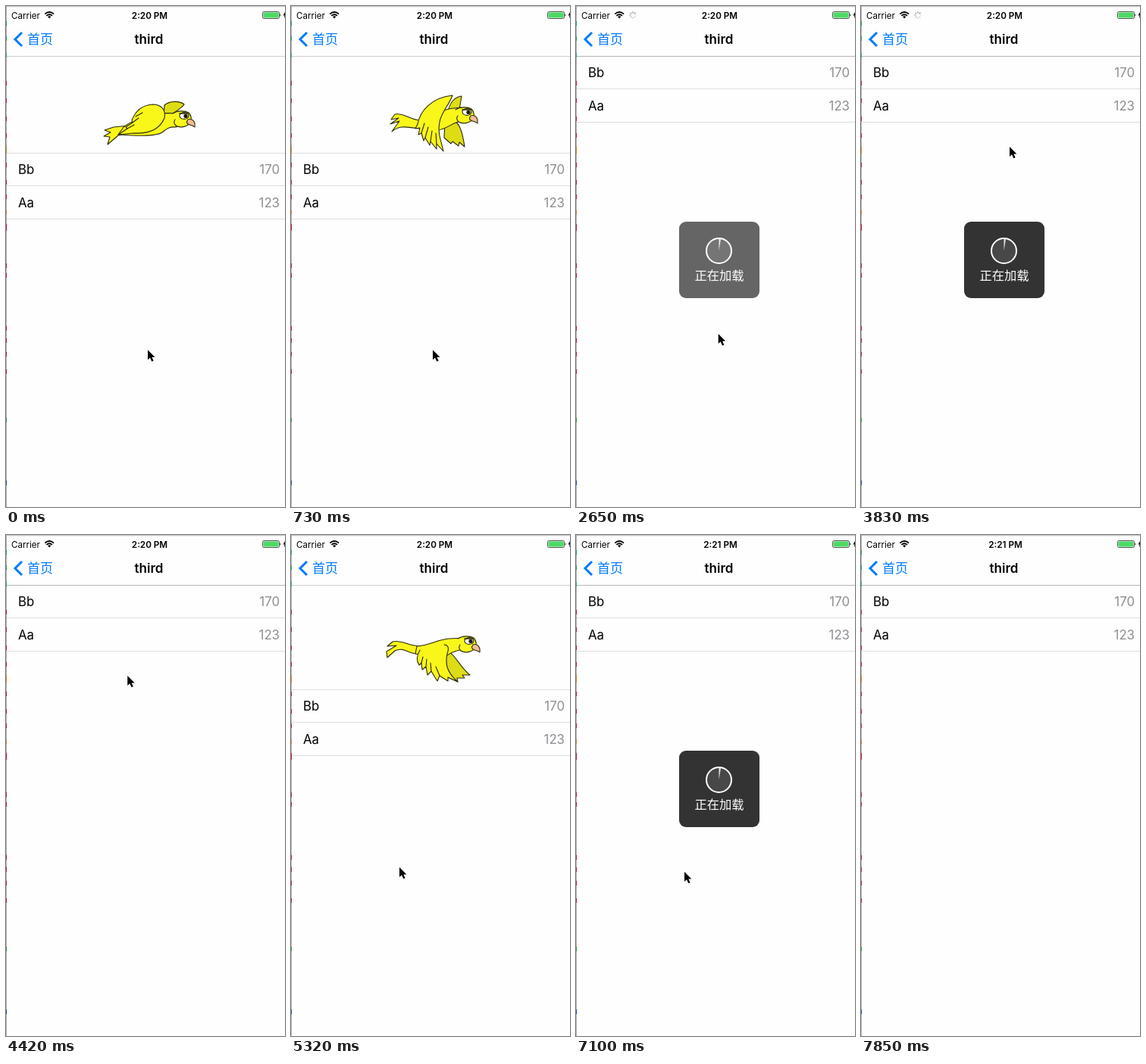
These frames come from a looping animation (368 px wide and 662 px high, 9.35 s). An HTML page:

```html
<!DOCTYPE html>
<html lang="zh">
<head>
<meta charset="utf-8">
<title>Pull to refresh</title>
<style>
  html, body { margin: 0; width: 100%; height: 100%; overflow: hidden; background: #fefefe; }
  svg { display: block; width: 100vw; height: 100vh; font-family: Inter, Roboto, sans-serif; }
  .cjk { font-family: "Noto Sans CJK SC", "Noto Sans CJK", sans-serif; }
  .value { fill: #8e8e93; text-anchor: end; }
  .bird { fill: #f9f71a; stroke: #2b290c; stroke-width: 1.1; stroke-linejoin: round; stroke-linecap: round; }
  .bird .far { fill: #dedc14; }
  .bird .line { fill: none; }
  .bird .plain { stroke: none; }
</style>
</head>
<body>
<svg viewBox="0 0 368 662">
  <defs>
    <clipPath id="below-nav"><rect y="67" width="368" height="595"/></clipPath>
  </defs>
  <rect width="368" height="662" fill="#fefefe"/>

  <g clip-path="url(#below-nav)">
    <g id="list">
      <g id="bird" class="bird"></g>
      <g fill="#dedee0">
        <rect y="194" width="368" height="1"/>
        <rect y="237" width="368" height="1"/>
        <rect y="281" width="368" height="1"/>
      </g>
      <g font-size="16.8">
        <text x="16" y="222">Bb</text><text class="value" x="361" y="222">170</text>
        <text x="16" y="266">Aa</text><text class="value" x="361" y="266">123</text>
      </g>
    </g>
  </g>

  <rect id="nav-line" y="66" width="368" height="1"/>
  <path d="M21 35L12 44L21 53" fill="none" stroke="#007aff" stroke-width="3"/>
  <text class="cjk" x="28" y="50" font-size="17" fill="#007aff">首页</text>
  <text x="188.5" y="50" font-size="17" font-weight="600" text-anchor="middle">third</text>

  <text x="7" y="16.5" font-size="11.6">Carrier</text>
  <g fill="none" stroke="#000" stroke-width="1.7">
    <path d="M51.3 10.6Q57.2 5.4 63.1 10.6M53.4 12.9Q57.2 9.6 61 12.9"/>
    <path d="M55 14L57.2 16.6L59.4 14Q57.2 12.4 55 14Z" fill="#000" stroke="none"/>
  </g>
  <g id="spinner" stroke="#777" stroke-width="1.1"></g>
  <text id="clock" y="16.5" font-size="11.7" font-weight="600" text-anchor="middle"></text>
  <rect x="338.5" y="7.5" width="22" height="9" rx="1.8" fill="#fff" stroke="#555"/>
  <rect x="339.5" y="8.5" width="20" height="7" rx="0.8" fill="#4cd964"/>
  <path d="M361.5 10.5Q363.5 12 361.5 13.5Z"/>
  <path d="M368 8L365.5 12.5H367.5L367 16L368 15Z"/>

  <g id="hud">
    <rect x="136" y="285" width="106" height="101" rx="9" fill="#333"/>
    <circle cx="188.5" cy="323.5" r="16.5" fill="#fff" fill-opacity=".1" stroke="#fff" stroke-width="2"/>
    <path d="M188.5 323.5V308H191Z" fill="#fff" fill-opacity=".85"/>
    <text class="cjk" x="189" y="361.5" font-size="16.3" font-weight="500" fill="#fff" text-anchor="middle">正在加载</text>
  </g>

  <g id="cursor">
    <path d="M0 0V13L3 10.2L5.300 15.300L7.600 14.300L5.400 9.400H9.400Z" stroke="#fff" stroke-width="1.6" stroke-linejoin="round" paint-order="stroke"/>
  </g>

  <rect width="368" height="1" fill="#c4c4c4"/>
  <rect y="1" width="368" height="1" fill="#eee"/>
  <rect width="1" height="662" fill="#aaa"/>
  <g id="edge"></g>
</svg>

<script>
const LOOP = 9350, STEP = 147.5, TOP = 66, OPEN = 194;
const $ = id => document.getElementById(id);
const path = (d, cls = '') => `<path class="${cls}" d="${d}"/>`;

// Open at the back, so that it runs into the neck
const head = (x, y) => `<g transform="translate(${x} ${y})">
  ${path('M-12 -8C-6 -12 4 -12 9 -9C13 -5 13 1 11 4C8 9 -2 12 -8 8L-13 2Z', 'plain')}
  ${path('M-12 -8C-6 -12 4 -12 9 -9C13 -5 13 1 11 4C8 9 -2 12 -8 8Q-12 4 -9 0', 'line')}
  <path d="M8 0C14 -2 18 3 17 10C14 7 11 8 8 6Q5 4 8 0Z" fill="#efbd92"/>
  <ellipse cx="3" cy="-5" rx="6" ry="4.4" fill="#fff"/>
  <circle cx="5" cy="-4.6" r="2.100" fill="#111"/>
  <path class="line" stroke-width="1.7" d="M-3 -8L8 -8"/></g>`;

// Wing beat: raised, folded, lowered, spread
const poses = {
  raised:
    path('M162 158L142 160L130 164L138 167L129 172L137 173L134 183L148 171L168 167Z') +
    path('M208 148L209 131C216 125 229 125 235 130C231 136 222 141 211 147Z', 'far') +
    path('M155 160C170 148 200 140 222 142L225 160C214 159 211 163 206 167C198 172 180 172 148 170Z') +
    path('M148 170L160 162L158 160L167 154L166 151C171 138 180 131 193 130C205 130 211 137 209 148C202 165 186 169 168 168L148 170Z') +
    path('M160 162L169 157M167 154L175 148M171 146L180 141', 'line') + head(232, 150),
  folded:
    path('M170 149C154 150 146 142 132 143L125 146L136 148L125 152L137 152L132 156C146 152 152 159 170 160Z') +
    path('M205 153C220 152 234 160 248 163L237 162L239 164L211 163Z', 'far') +
    path('M169 145C180 137 198 138 206 141C212 136 218 135 226 136L228 155C216 153 212 160 205 168Z') +
    path('M169 145C180 138 200 139 206 143C211 154 207 163 204 170C195 176 185 175 182 172L174 171L175 168L166 165L168 162L159 160C167 156 170 152 169 145Z') +
    path('M175 168L184 169M168 162L176 164M204 170Q207 160 215 157', 'line') + head(231, 146),
  lowered:
    path('M172 137C155 137 146 128 134 131L127 137L139 136L126 144L127 152L137 143C147 138 154 145 160 146L172 148Z') +
    path('M203 146C212 138 220 162 236 175L226 175L229 179L219 179L220 184L207 178Z', 'far') +
    path('M166 137C182 136 194 128 208 127L228 126L226 142C214 141 206 151 196 153L164 147Z') +
    path('M170 142C166 149 165 156 169 162L172 159L173 168L178 164L180 175L185 170L193 183L196 176L207 183L207 178L220 184C206 172 203 161 206 147C209 139 207 135 202 135') +
    path('M172 159L174 151M178 164L179 154M185 170L184 159M196 176L191 164', 'line') + head(232, 135),
  spread:
    path('M172 151C158 152 151 141 137 143L132 150L142 148L131 156L143 152L133 166C144 156 155 161 171 162Z') +
    path('M207 142C208 127 217 120 225 119L222 137Z', 'far') +
    path('M203 153C221 144 226 165 229 186L222 180L221 185L213 179L211 182L202 174Z', 'far') +
    path('M170 151C184 143 203 135 224 134L226 152C214 152 204 165 191 164L170 160Z') +
    path('M167 156C170 140 184 121 213 118C208 132 199 139 196 153C193 168 198 178 201 192L192 182L192 189L184 179L183 184L177 174L175 178L172 168L168 170L170 161L164 162Z') +
    path('M172 168L176 155M177 174L181 160M184 179L186 165M192 182L191 168', 'line') + head(229, 145)
};
const beat = ['raised', 'folded', 'folded', 'lowered', 'lowered', 'spread'];

$('spinner').innerHTML = Array.from({ length: 8 }, (_, i) =>
  `<path d="M0 -2.4V-4.8" transform="translate(75 12) rotate(${i * 45})"/>`).join('');

// Specks of the window behind, along the left edge
const specks = { '#b5122f': [99, 122, 146, 168, 207, 230, 249, 288, 291, 340, 353, 423, 439, 457, 480],
  '#c87a1e': [185, 189, 270], '#1d9a45': [20, 40, 544], '#2a9aa0': [62], '#1c3fa0': [627] };
$('edge').innerHTML = Object.entries(specks).map(([color, ys]) =>
  ys.map(y => `<rect y="${y}" width="1" height="6" fill="${color}"/>`).join('')).join('');

const clamp = p => Math.min(1, Math.max(0, p));
const smooth = p => p * p * (3 - 2 * p);
const between = (t, a, b) => t >= a && t < b;

// Eases through [time, value] points
function track(t, points, ease = smooth) {
  let [start, value] = points[0];
  for (const [end, next] of points.slice(1)) {
    if (t < end) return value + (next - value) * ease(clamp((t - start) / (end - start)));
    [start, value] = [end, next];
  }
  return value;
}

const listTrack = [[2108, OPEN], [2408, TOP], [4720, TOP], [5310, 204], [5400, 204], [5650, OPEN], [6205, OPEN], [6505, TOP]];
const hudTrack = [[2460, 0], [2720, 1], [4000, 1], [4260, 0], [6303, 0], [6563, 1], [7150, 1], [7410, 0]];
const cursorX = [[2500, 187], [3400, 196], [4000, 196], [4600, 151], [4720, 151], [5310, 143]];
const cursorY = [[2500, 454.5], [3400, 186], [4600, 186], [4720, 191], [5310, 439], [5400, 439], [5800, 445]];

function draw(time) {
  const step = Math.floor((time + 12) / STEP);
  const t = step * STEP;
  const top = track(t, listTrack);
  const second = t > 4000;

  $('list').setAttribute('transform', `translate(0 ${Math.round(top - OPEN)})`);
  const birdShown = t < 2108 || between(t, 4720, 6206);
  $('bird').innerHTML = birdShown ? poses[beat[(step + (second ? 3 : 0)) % beat.length]] : '';
  $('nav-line').setAttribute('fill', top < 67 ? '#b6b6b8' : '#cfcfd1');

  const loading = between(t, 2500, 4000) || between(t, 6300, 7000);
  $('spinner').style.display = loading ? '' : 'none';
  [...$('spinner').children].forEach((spoke, i) =>
    spoke.setAttribute('opacity', 0.25 + 0.75 * ((i - step + 800) % 8) / 7));

  const late = t >= 6800;
  $('clock').textContent = late ? '2:21 PM' : '2:20 PM';
  $('clock').setAttribute('x', late ? 190.5 : 189.5);
  $('hud').setAttribute('opacity', track(t, hudTrack, p => p));
  $('cursor').setAttribute('transform', `translate(${track(t, cursorX)} ${track(t, cursorY)})`);
  $('cursor').style.display = t < 7800 ? '' : 'none';
}

function tick() {
  draw(performance.now() % LOOP);
  requestAnimationFrame(tick);
}
tick();
</script>
</body>
</html>
```
